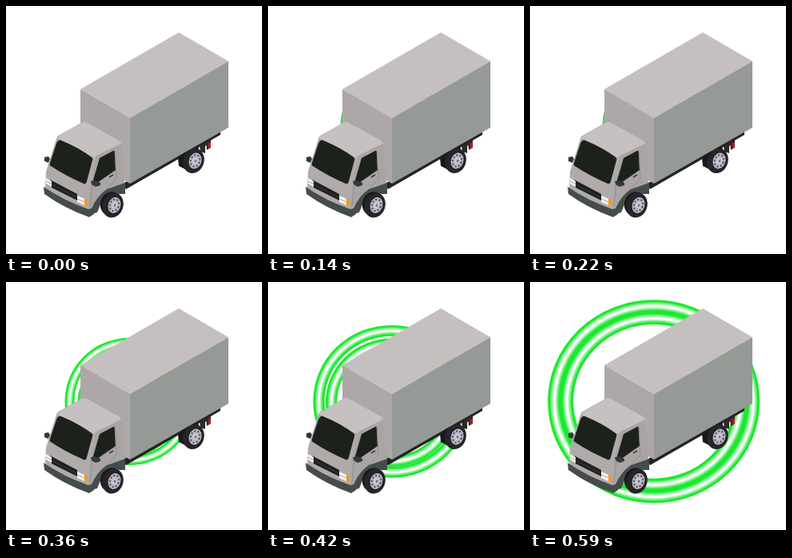
Write an HTML page that moves like this. It is 320 by 310 pixels and loops after 0.69 s.

```html
<!DOCTYPE html>
<html>
<head>
<meta charset="utf-8">
<style>
html, body { margin: 0; width: 100%; height: 100%; overflow: hidden; background: #fff; }
svg { display: block; }
</style>
</head>
<body>
<svg width="320" height="310" viewBox="0 0 320 310">
  <defs>
    <g id="wheel">
      <ellipse cx="-3" cy="-1" rx="13" ry="15" transform="rotate(18)" fill="#19191b"/>
      <ellipse rx="13" ry="15.8" transform="rotate(18)" fill="#262628"/>
      <g transform="translate(2) rotate(18)">
        <ellipse rx="8.8" ry="11.2" fill="#1d1d20"/>
        <ellipse rx="7.8" ry="10.2" fill="#b9b5c5"/>
        <ellipse rx="5.5" ry="7.4" fill="none" stroke="#4c4955" stroke-width="1.9" stroke-dasharray="2 2.4"/>
        <ellipse rx="3" ry="4" fill="#d0ccd9"/>
        <ellipse cx=".5" rx="1.4" ry="2" fill="#77727f"/>
      </g>
    </g>
  </defs>
  <g id="rings"></g>

  <!-- chassis and rear axle -->
  <path d="M146 222L268 155V161L150 229Z" fill="#232524"/>
  <path d="M215 190L240 175L243 188L228 206L216 200Z" fill="#19191b"/>
  <path d="M242 175L256 167V171L249 175V184L243 182Z" fill="#292b2a"/>
  <path d="M250 171L256 168V177L251 180Z" fill="#4a2024"/>
  <path d="M253 172L256 170V177L253 178Z" fill="#a8262e"/>
  <use href="#wheel" x="234.5" y="193.5"/>

  <!-- cargo box -->
  <path d="M93 104L216 33L278 69L155 140Z" fill="#c6bfc0"/>
  <path d="M93 104L155 140V222L93 186Z" fill="#aea7a8"/>
  <path d="M155 140L278 69V152L155 222Z" fill="#969a96"/>

  <!-- cab -->
  <path d="M64 163L94 146Q97 144 101 146L141 168Q145 170 146 175L148 222L132 228L120 238L110 256L102 256L49 229L50 207Z" fill="#b0abaa"/>
  <path d="M63 165L94 146Q97 144 101 146L141 168Q144 170 144 172L113 187L110 190Q88 177 63 165Z" fill="#c7c0c1"/>
  <path d="M113 187L144 172Q146 176 146 181L148 222L132 228L120 237L109 253L103 254L105 224Z" fill="#aaa5a4"/>
  <path d="M66 168Q67 167 69 168Q91 177 107 189Q109 190 108 193L101 219Q100 223 97 222Q74 212 56 200Q54 199 55 196L63 172Q64 169 66 168Z" fill="#1d211c"/>
  <path d="M117 190L134 181Q136 180 136 183L137 205L114 221L108 221Z" fill="#1d211c"/>
  <path d="M136 181L138 216L123 232M108 221L105 250" fill="none" stroke="#8c8888" stroke-width=".8"/>
  <path d="M129 214L134 211" stroke="#383b3a" stroke-width="1.5"/>
  <path d="M55 217L89 235V243L57 227Z" fill="#1e211e"/>
  <path d="M57 223L88 239" stroke="#454942" stroke-width=".7"/>
  <path d="M50 215L57 219V226L50 222Z" fill="#f5f5ef"/>
  <path d="M89 237L98 241V249L89 245Z" fill="#f5f5ef"/>
  <path d="M50 219L57 222.5M89 241L98 245" stroke="#8f908d" stroke-width=".8"/>
  <path d="M98 241L102 242V249L98 249Z" fill="#f39a16"/>
  <path d="M47 226Q72 243 103 254L110 252V260L104 264Q73 253 48 235Z" fill="#454c4d"/>
  <path d="M48 189L53 188L55 191L53 196L48 194Z" fill="#34373d"/>
  <path d="M106 219L112 218L118 221V224L112 226L107 223Z" fill="#343740"/>
  <path d="M107 253Q114 237 126 229L149 221V235L142 235Q131 232 118 248L114 258L107 260Z" fill="#454c4d"/>
  <use href="#wheel" x="133.5" y="249"/>
</svg>
<script>
const STARTS = [0, 140, 280, 420, 510, 590], LOOP = 690;
const GREEN = '#1ae82e', SPACING = 15.7;
const rings = document.getElementById('rings');

// A glossy band: green at both rims, white along the middle.
function band(id, radius, width, dy) {
  const stops = [[0, GREEN], [.14, GREEN], [.46, '#fff'], [.54, '#fff'], [.86, GREEN], [1, GREEN]]
    .map(([p, c]) => `<stop offset="${1 - width * (1 - p) / radius}" stop-color="${c}"/>`).join('');
  return `<radialGradient id="${id}" gradientUnits="userSpaceOnUse" cx="0" cy="0" r="${radius}">${stops}</radialGradient>
    <circle r="${radius - width / 2}" fill="none" stroke="url(#${id})" stroke-width="${width}" transform="translate(0 ${dy})"/>`;
}

let shown = -1;
function draw(now) {
  const t = now % LOOP;
  const step = STARTS.filter(s => s <= t).length - 1;
  if (step !== shown) {
    shown = step;
    const rx = 47 + 17.1 * step, ry = 48 + 15.8 * step;
    const width = Math.min(SPACING + .6, 7.6 + 2.2 * step);
    const gap = Math.max(0, SPACING - width);
    rings.setAttribute('transform', `translate(154.7 149.3) scale(1 ${ry / rx})`);
    // The inner band hangs low enough to touch the outer one at the bottom.
    rings.innerHTML = band('inner', rx - SPACING, width, gap) + band('outer', rx, width, 0);
  }
  requestAnimationFrame(draw);
}
draw(0);
</script>
</body>
</html>
```
